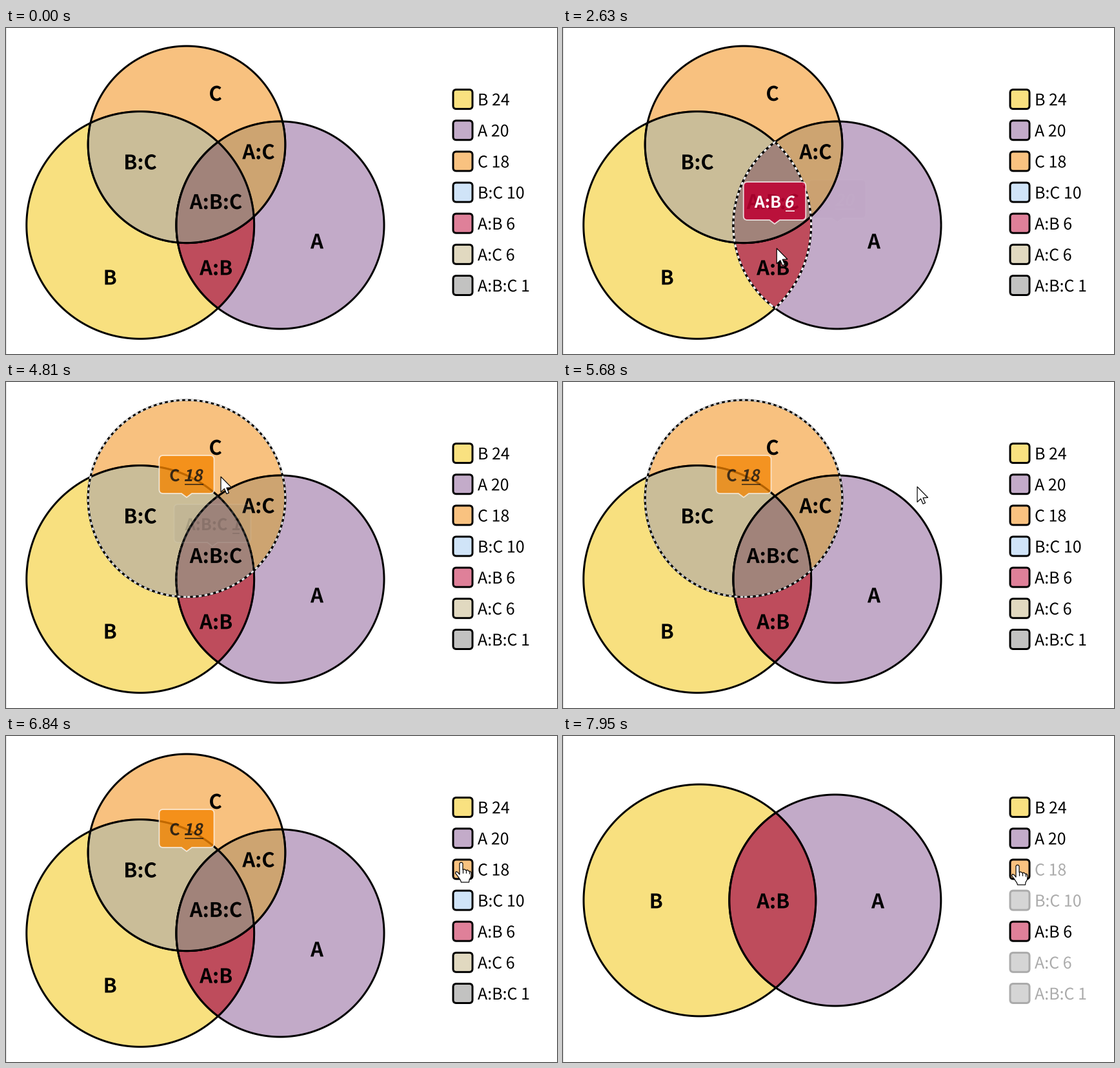
A matplotlib script that plays this animation: 854x506 px, repeating every 8000 ms.

```python
import numpy as np
import matplotlib.pyplot as plt
from matplotlib.animation import FuncAnimation
from matplotlib.colors import to_rgb
from matplotlib.patches import FancyBboxPatch, PathPatch, Polygon
from matplotlib.path import Path
from matplotlib.textpath import TextPath
from matplotlib.transforms import Affine2D

W, H, DPI = 854, 506, 64
PX = 72 / DPI  # points per pixel
LOOP, STEP = 8000, 25
FADE = 400
HIDE_AT, HIDE_TIME = 7390, 500

# name: value, colour, label position
SETS = {
    "B": (24, "#F3C300", (162, 387)),
    "A": (20, "#875692", (482, 331)),
    "C": (18, "#F38400", (325, 101.5)),
    "B:C": (10, "#A1CAF1", (209, 208)),
    "A:B": (6, "#BE0032", (325, 372)),
    "A:C": (6, "#C2B280", (391, 192)),
    "A:B:C": (1, "#848482", (325, 269.5)),
}
DISCS = {"A": (425, 306, 161), "B": (208.2, 306, 176.4), "C": (280, 180.8, 152.8)}
DISCS_END = {"A": (421.8, 255, 164), "B": (211.9, 255, 179.9), "C": DISCS["C"]}
LABELS_END = {"A": (488, 256), "B": (145, 256), "A:B": (325, 256)}

# name, pointer tip, text colour, spans of visibility, spans of outline
HOVERS = [
    ("A", (425, 301), "white", [(1080, 2350)], [(1080, 2350)]),
    ("A:B", (328, 304), "white", [(2350, 3400)], [(2350, 3400)]),
    ("A:B:C", (320, 255), "black", [(3400, 4600)], [(3400, 4600)]),
    ("C", (280, 179), "#1c1814", [(4600, 5650), (6620, 7390)], [(4600, 5650)]),
]


def clamp(u):
    return min(max(u, 0.0), 1.0)


def ease_out(u, power=3):
    return 1 - (1 - clamp(u)) ** power


def ease_both(u):
    u = clamp(u)
    return u * u * (3 - 2 * u)


def mix(a, b, u):
    return np.array(a) * (1 - u) + np.array(b) * u


# start, end, target, easing
MOVES = [
    (740, 1300, (480, 359), ease_both),
    (2020, 2640, (331, 342), ease_both),
    (3300, 3700, (334, 291), ease_both),
    (4270, 4780, (333, 147), ease_both),
    (5500, 6160, (638, 169), lambda u: ease_out(u, 4)),
    (6370, 6800, (705.5, 196), ease_both),
    (7120, 7190, (704.5, 200), ease_both),
]


def pointer_at(t):
    pos = np.array((707.0, 484.0))
    for start, end, target, ease in MOVES:
        pos = mix(pos, target, ease((t - start) / (end - start)))
    return pos


def strength(t, spans):
    return max(ease_out((t - a) / FADE) * (1 - ease_out((t - b) / FADE)) for a, b in spans)


def region(name, discs):
    """Outline of the overlap of the named discs."""
    angle = np.linspace(0, 2 * np.pi, 1440, endpoint=False)
    members = [discs[k] for k in name.split(":")]
    points = []
    for cx, cy, r in members:
        ring = np.column_stack((cx + r * np.cos(angle), cy + r * np.sin(angle)))
        inside = [np.hypot(ring[:, 0] - x, ring[:, 1] - y) <= q + 1e-6 for x, y, q in members]
        points.append(ring[np.all(inside, axis=0)])
    points = np.concatenate(points)
    dx, dy = (points - points.mean(axis=0)).T
    return points[np.argsort(np.arctan2(dx, -dy))]


def glyphs(text, size, weight="normal", slant=0):
    raw = TextPath((0, 0), text, size=size,
                   prop={"family": "Noto Sans CJK JP", "weight": weight})
    flip = Affine2D().skew_deg(slant, 0).scale(1, -1)
    return Path(flip.transform(raw.vertices), raw.codes)


def place(patch, x, y):
    patch.set_transform(Affine2D().translate(x, y) + ax.transData)


def add_text(path, x, y, color, z):
    patch = ax.add_patch(PathPatch(path, fc=color, lw=0, zorder=z))
    place(patch, x, y)
    return patch


def balloon(cx, tip, width, height=59, r=6, stem=6, half=8):
    """Rounded box with a small pointer below."""
    x0, x1, y1 = cx - width / 2, cx + width / 2, tip - stem
    y0 = y1 - height
    M, L, Q = Path.MOVETO, Path.LINETO, Path.CURVE3
    steps = [(M, x0 + r, y0), (L, x1 - r, y0), (Q, x1, y0), (Q, x1, y0 + r),
             (L, x1, y1 - r), (Q, x1, y1), (Q, x1 - r, y1),
             (L, cx + half, y1), (L, cx, tip), (L, cx - half, y1),
             (L, x0 + r, y1), (Q, x0, y1), (Q, x0, y1 - r),
             (L, x0, y0 + r), (Q, x0, y0), (Q, x0 + r, y0), (Path.CLOSEPOLY, x0 + r, y0)]
    return Path([s[1:] for s in steps], [s[0] for s in steps])


class Tooltip:
    def __init__(self, name, tip, ink):
        value, self.color, _ = SETS[name]
        title = glyphs(name, 25, "bold")
        number = glyphs(str(value), 25, "bold", 12)
        a, b = title.get_extents(), number.get_extents()
        gap = 8
        total = a.width + gap + b.width
        left, base = tip[0] - total / 2, tip[1] - 25
        right = left + a.width + gap
        self.body = ax.add_patch(PathPatch(balloon(*tip, total + 34), lw=1.8 * PX, zorder=30))
        rule = Path([(right, base + 4.5), (right + b.width, base + 4.5)])
        self.line = ax.add_patch(PathPatch(rule, ec=ink, fill=False, lw=1.6 * PX, zorder=31))
        self.parts = [add_text(title, left - a.x0, base, ink, 31),
                      add_text(number, right - b.x0, base, ink, 31), self.line]

    def show(self, alpha):
        self.body.set_facecolor((*to_rgb(self.color), 0.9 * alpha))
        self.body.set_edgecolor((1, 1, 1, 0.8 * alpha))
        self.body.set_visible(alpha > 0)
        for part in self.parts:
            part.set_alpha(alpha)
            part.set_visible(alpha > 0)


fig = plt.figure(figsize=(W / DPI, H / DPI), dpi=DPI, facecolor="white")
ax = fig.add_axes([0, 0, 1, 1])
ax.set_xlim(0, W)
ax.set_ylim(H, 0)
ax.axis("off")
ax.add_patch(Polygon([(0, 0), (1, 0), (1, H), (0, H)], fc="#E0E0E0", lw=0))

slices, labels, legend = {}, {}, {}
for row, (name, (value, color, spot)) in enumerate(SETS.items()):
    slices[name] = ax.add_patch(Polygon(region(name, DISCS), lw=3 * PX, joinstyle="round",
                                        zorder=2 + row))
    word = glyphs(name, 31, "bold")
    box = word.get_extents()
    word = Path(word.vertices - ((box.x0 + box.x1) / 2, -11.4), word.codes)
    labels[name] = add_text(word, *spot, "black", 25)
    y = 110.6 + 48.15 * row
    swatch = ax.add_patch(FancyBboxPatch((693, y - 15), 30, 30, lw=3 * PX, zorder=20,
                                         boxstyle="round,pad=0,rounding_size=5"))
    caption = add_text(glyphs(f"{name} {value}", 25), 731, y + 9.6, "black", 20)
    legend[name] = swatch, caption

outlines, tooltips = [], []
for name, tip, ink, _, _ in HOVERS:
    outlines.append(ax.add_patch(Polygon(region(name, DISCS), fill=False, ec="white",
                                         lw=3 * PX, ls=(0, (1.5, 1.5)), zorder=22)))
    tooltips.append(Tooltip(name, tip, ink))

ARROW = np.array([(0, 0), (0, 17), (3.9, 13.3), (6.4, 19), (8.9, 17.9),
                  (6.4, 12.3), (11.8, 12)]) * 1.4
HAND = [(-2.5, 2), (-1.2, 0.3), (1.2, 0.3), (2.5, 2), (2.5, 11.5), (5, 10.8), (7.3, 12.5),
        (10, 12), (12, 14), (14.2, 14), (15.6, 16.5), (15, 23), (12.6, 27), (12, 31),
        (0, 31), (-1, 28), (-5, 22), (-9, 17), (-8, 14.5), (-5.5, 15.3), (-2.5, 19)]
KNUCKLES = Path([(2.5, 11), (2.5, 17), (7.3, 12), (7.3, 17), (12, 14), (12, 18)],
                [Path.MOVETO, Path.LINETO] * 3)
style = dict(fc="white", ec="black", lw=1.2 * PX, joinstyle="round", zorder=40)
arrow = ax.add_patch(Polygon(ARROW, **style))
hand = [ax.add_patch(Polygon(HAND, **style)),
        ax.add_patch(PathPatch(KNUCKLES, **{**style, "fc": "none"}))]


def draw(frame):
    t = frame * STEP
    gone = ease_out((t - HIDE_AT) / HIDE_TIME)
    discs = {k: mix(DISCS[k], DISCS_END[k], gone) for k in DISCS}

    for name, (_, color, spot) in SETS.items():
        hidden = gone if "C" in name else 0
        shape = slices[name]
        shape.set_xy(region(name, discs))
        shape.set_facecolor((*to_rgb(color), 0.5 * (1 - hidden)))
        shape.set_edgecolor((0, 0, 0, 1 - hidden))
        shape.set_visible(hidden < 1)
        labels[name].set_alpha(1 - hidden)
        place(labels[name], *mix(spot, LABELS_END.get(name, spot), gone))

        swatch, caption = legend[name]
        off = 0 if name == "C" else hidden
        swatch.set_facecolor(mix(mix((1, 1, 1), to_rgb(color), 0.5), to_rgb("#D5D5D5"), off))
        swatch.set_edgecolor(mix((0, 0, 0), to_rgb("#ABABAB"), off))
        caption.set_facecolor(mix((0, 0, 0), to_rgb("#ABABAB"), hidden))

    for (_, _, _, shown, dashed), outline, tooltip in zip(HOVERS, outlines, tooltips):
        outline.set_alpha(strength(t, dashed))
        tooltip.show(strength(t, shown))

    x, y = pointer_at(t)
    over_legend = x >= 690 and t > 6370
    arrow.set_visible(t >= 740 and not over_legend)
    place(arrow, x, y)
    for part in hand:
        part.set_visible(over_legend)
        place(part, x, y)
    return []


anim = FuncAnimation(fig, draw, frames=LOOP // STEP, interval=STEP,
                     repeat=True, repeat_delay=0, blit=False)
plt.show()
```
